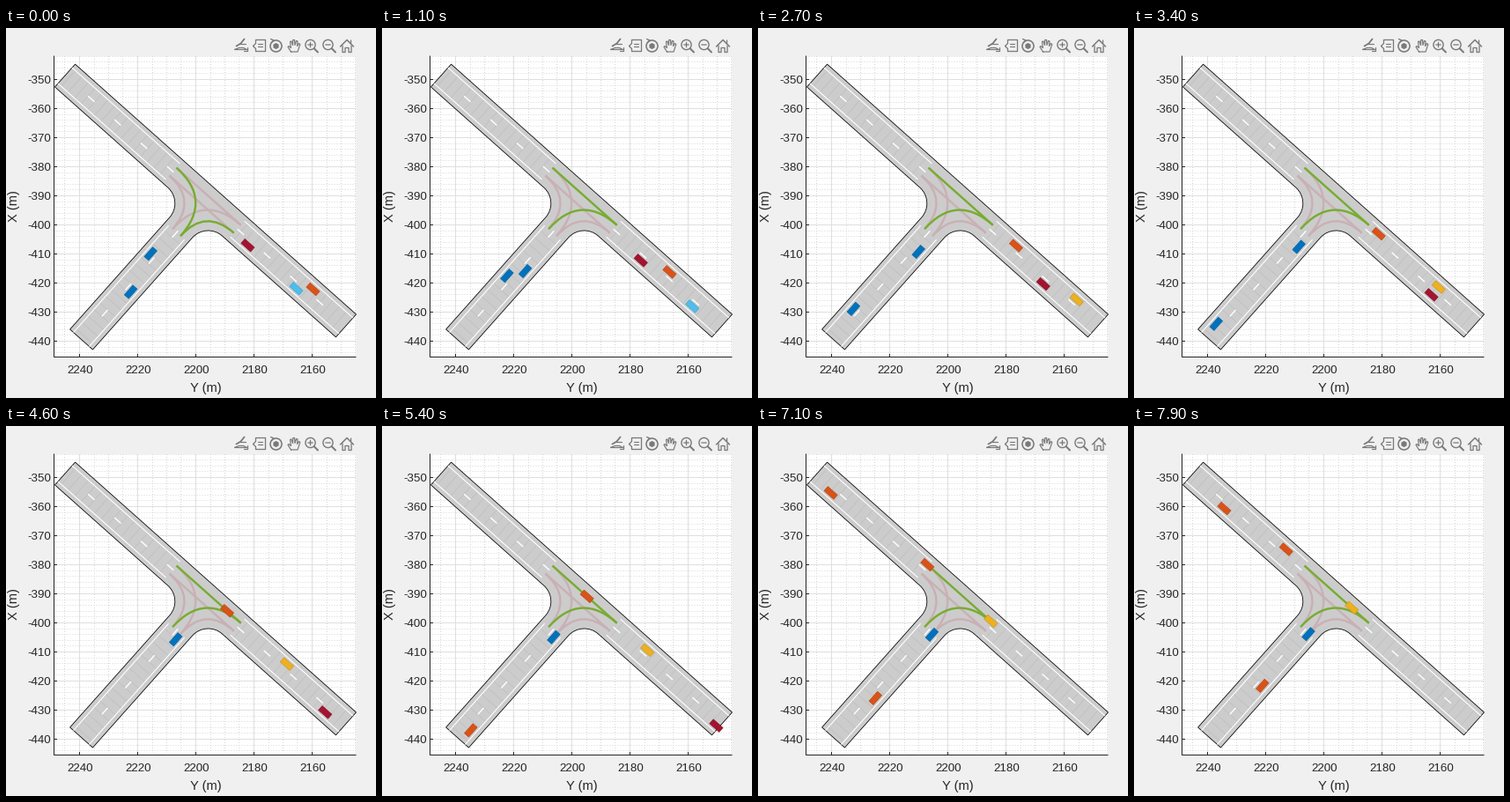
A matplotlib script for the animation above (8 s loop, 420x420 px).

```python
import numpy as np
import matplotlib.pyplot as plt
from matplotlib.animation import FuncAnimation
from matplotlib.collections import LineCollection
from matplotlib.colors import to_rgb
from matplotlib.patches import Circle, PathPatch, Polygon
from matplotlib.path import Path

SIZE, DPI = 420, 100
FRAMES, STEP = 80, 100
PX = 72 / DPI  # points per pixel

plt.rcParams["font.family"] = "Liberation Sans"
plt.rcParams["path.snap"] = False
fig = plt.figure(figsize=(SIZE / DPI, SIZE / DPI), dpi=DPI, facecolor="#f0f0f0")
ax = fig.add_axes([0, 0, 1, 1])
# whole numbers are pixel centres
ax.set(xlim=(-0.5, SIZE - 0.5), ylim=(SIZE - 0.5, -0.5))
ax.axis("off")

INK = "#262626"
LEFT, RIGHT, TOP, BOTTOM = 54, 396.5, 31.5, 373


def line(pts, color, width=1.0, z=1, **kw):
    x, y = zip(*pts)
    ax.plot(x, y, color=color, lw=width * PX, zorder=z, **kw)


def segments(segs, color, width=1.0, z=1, **kw):
    ax.add_collection(LineCollection(segs, colors=color, linewidths=width * PX,
                                     zorder=z, **kw), autolim=False)


def label(x, y, s, size, ha="center", va="center", **kw):
    ax.text(x, y, s, fontsize=size * PX, color=INK, ha=ha, va=va, **kw)


# ---- plot area, grid and labels
ax.add_patch(Polygon([(LEFT, TOP), (RIGHT, TOP), (RIGHT, BOTTOM), (LEFT, BOTTOM)],
                     fc="white", ec="none", zorder=0))


def grid(xs, ys, *style, **kw):
    segments([[(x, TOP), (x, BOTTOM)] for x in xs if LEFT < x < RIGHT]
             + [[(LEFT, y), (RIGHT, y)] for y in ys if TOP < y < BOTTOM], *style, **kw)


xticks = 83 + 66 * np.arange(5)
yticks = 58 + 33 * np.arange(10)
grid(np.round(83 + 16.5 * np.arange(-1, 20)), np.round(58 + 6.6 * np.arange(-4, 48)),
     "#d6d6d6", 1, 0.2, linestyles=[(0, (1, 2))])
grid(xticks, yticks, "#dfdfdf", 1, 0.3)

line([(LEFT, TOP), (LEFT, BOTTOM), (RIGHT, BOTTOM)], INK, 1, 5)
segments([[(x, BOTTOM), (x, BOTTOM - 3.5)] for x in xticks]
         + [[(LEFT, y), (LEFT + 3.5, y)] for y in yticks], INK, 1, 5)
for i, x in enumerate(xticks):
    label(x + 0.5, 389, str(2240 - 20 * i), 13.33)
for i, y in enumerate(yticks):
    label(50.5, y + 0.5, str(-350 - 10 * i), 13.33, "right", "center_baseline")
label(226, 408.5, "Y (m)", 14.67)
label(8.5, 202, "X (m)", 14.67, rotation=90)


# ---- road
class Road:
    """Straight centre line; `at` takes distance along and offset sideways."""

    def __init__(self, origin, along, side, length):
        self.o, self.d, self.n = map(np.array, (origin, along, side))
        self.length = length

    def at(self, s, off=0.0):
        return self.o + s * self.d + off * self.n


HALF, EDGE, LANE = 17.3, 12, 6
CROSS = 213  # where the branch axis meets the main road
GAP_W, GAP_E, GAP_S = 164, 262, 162.5  # where lanes end at the junction
main = Road((66.5, 53.5), (0.747, 0.665), (0.665, -0.747), 427)
branch = Road(main.at(CROSS, -211.4), main.n, main.d, GAP_S)

M, L, Q, C = Path.MOVETO, Path.LINETO, Path.CURVE3, Path.CURVE4


def fillet(side, r=24):
    """Rounded corner, listed from the main road to the branch."""
    corner = main.at(CROSS + side * HALF, -HALF)
    a, b = side * main.d, -main.n
    return [corner + r * a, corner + 0.448 * r * a, corner + 0.448 * r * b, corner + r * b]


outline = [main.at(0, HALF), main.at(main.length, HALF), main.at(main.length, -HALF),
           *fillet(1), branch.at(0, HALF), branch.at(0, -HALF),
           *fillet(-1)[::-1], main.at(0, -HALF), main.at(0, HALF)]
bend = [L, C, C, C]
codes = [M, L, L, *bend, L, L, *bend, L, Path.CLOSEPOLY]
ax.add_patch(PathPatch(Path(outline, codes), fc="#cccccc", ec="black",
                       lw=0.8 * PX, zorder=1))

for road, s0, s1 in ((main, 0, GAP_W), (main, GAP_E, main.length), (branch, 0, GAP_S)):
    segments([[road.at(s, -EDGE), road.at(s, EDGE)] for s in np.arange(s0 + 5, s1, 10)],
             "#c0c0c0", 0.8, 1.1)
    segments([[road.at(s0, o), road.at(s1, o)] for o in (-EDGE, EDGE)], "white", 1.1, 1.2)
    first = s0 + 5 if s0 else 40
    segments([[road.at(s - 5), road.at(s + 5)] for s in np.arange(first, s1, 40)],
             "white", 1.4, 1.2)


# ---- junction paths
def route(a, b, ctrl=None):
    path = Path([a, b]) if ctrl is None else Path([a, ctrl, b], [M, Q, Q])
    patch = PathPatch(path, fc="none", capstyle="butt")
    ax.add_patch(patch)
    return patch


def turn(a, b, branch_off, main_off):
    return route(a, b, main.at(CROSS + branch_off, main_off))


nw_out, nw_in = (main.at(GAP_W, o) for o in (LANE, -LANE))
se_in, se_out = (main.at(GAP_E, o) for o in (LANE, -LANE))
sw_in, sw_out = (branch.at(GAP_S, o) for o in (LANE, -LANE))
early = [turn(sw_in, nw_out, LANE, LANE), turn(sw_in, se_out, LANE, -LANE)]
late = [route(se_in, nw_out), turn(se_in, sw_out, -LANE, LANE)]
closed = [route(nw_in, se_out), turn(nw_in, sw_out, -LANE, -LANE)]
SWITCH = 0.5


def signal(t):
    green = early if t < SWITCH else late
    for r in early + late + closed:
        on = r in green
        r.set(edgecolor="#77ac30" if on else "#c9b0b4",
              linewidth=2.4 * PX, zorder=2.1 if on else 2)


# ---- cars
BLUE, ORANGE, YELLOW = "#0072bd", "#d95319", "#edb120"
CYAN, RED = "#4dbeee", "#a2142f"
CAR = np.array([(-1, -1), (1, -1), (1, 1), (-1, 1)]) * (7.3, 3.3)


def drive(s0, v, a=0.0):
    return lambda t: s0 + v * t + a * t * t


def brake(t):
    """Roll up to the stop line and settle there."""
    return 164 - 86.4 * np.exp(-(t / 2.25) ** 1.1)


# road, lane, colour, entry time in s, distance along the road since entry
CARS = [
    (main, -LANE, RED, 0, drive(283, 22.9, 0.58)),
    (main, -LANE, CYAN, 0, drive(356.7, 26.6, 1)),
    (main, LANE, ORANGE, 0, drive(371.5, -26.4, -0.43)),
    (main, LANE, YELLOW, 1.5, drive(main.length - 1, -31, 0.2)),
    (main, -LANE, ORANGE, 6.4, drive(3, 33.2)),
    (branch, -LANE, BLUE, 0, drive(125, -30, -0.4)),
    (branch, LANE, BLUE, 0, brake),
    (branch, LANE, ORANGE, 5, drive(3, 33.9, -2.07)),
]
bodies = []
for _, _, color, _, _ in CARS:
    body = Polygon(np.zeros((4, 2)), fc=color, ec=np.array(to_rgb(color)) * 0.85,
                   lw=0.6 * PX, zorder=4)
    bodies.append(ax.add_patch(body))


# ---- toolbar icons
GREY = "#7a7a7a"


def icon(pts, width=1.3):
    line(pts, GREY, width, 6, solid_capstyle="round")


def ring(x, y, r, width=1.4):
    ax.add_patch(Circle((x, y), r, fc="none", ec=GREY, lw=width * PX, zorder=6))


# brush
icon([(259, 24), (264, 22), (269, 22), (273, 24), (259, 24)], 1.2)
icon([(261, 20), (266, 17), (270, 12)], 1.8)
icon([(266, 18), (272, 18)], 1.2)
icon([(270, 26), (274, 26), (274, 22)], 1.2)
# data tip
icon([(280, 20), (283, 17), (283, 13), (294, 13), (294, 26), (283, 26), (283, 23), (280, 20)])
for y in (18, 21):
    icon([(286, y), (291, y)], 1.2)
# rotate
ring(306, 20, 6.5, 1.6)
ax.add_patch(Polygon([(306 + 3.6 * np.sin(a), 20 - 3.6 * np.cos(a))
                      for a in np.arange(6) * np.pi / 3], fc=GREY, ec="none", zorder=6))
icon([(300, 12), (303.5, 13.5), (301, 16)])
# hand
icon([(323, 26.5), (319.5, 21), (320.5, 20), (323, 22), (322, 15), (323.5, 14.5), (325, 19),
      (325.3, 13), (327, 13), (327.5, 19), (329, 14), (330.5, 14.5), (330, 20),
      (332, 17), (333.3, 18), (330.5, 26.5), (323, 26.5)], 1.2)
# zoom in, zoom out
for x in (345, 365):
    ring(x, 18.5, 5.6)
    icon([(x + 4.3, 22.8), (x + 8.5, 27)], 2)
    icon([(x - 2.7, 18.5), (x + 2.7, 18.5)])
icon([(345, 15.8), (345, 21.2)])
# home
icon([(379, 20.5), (386.5, 13), (394, 20.5)], 1.5)
icon([(381.5, 19.5), (381.5, 27), (384.5, 27), (384.5, 22), (388.5, 22), (388.5, 27),
      (391.5, 27), (391.5, 19.5)])
icon([(391, 13.5), (391, 17)])


def draw(k):
    t = k * STEP / 1000
    signal(t)
    for (road, off, _, start, motion), body in zip(CARS, bodies):
        s = motion(max(t - start, 0))
        body.set_visible(t >= start and 0 <= s <= road.length + 2)
        body.set_xy([road.at(s + u, off + w) for u, w in CAR])
    return bodies


anim = FuncAnimation(fig, draw, frames=FRAMES, interval=STEP, repeat=True,
                     repeat_delay=0, blit=False)
plt.show()
```
